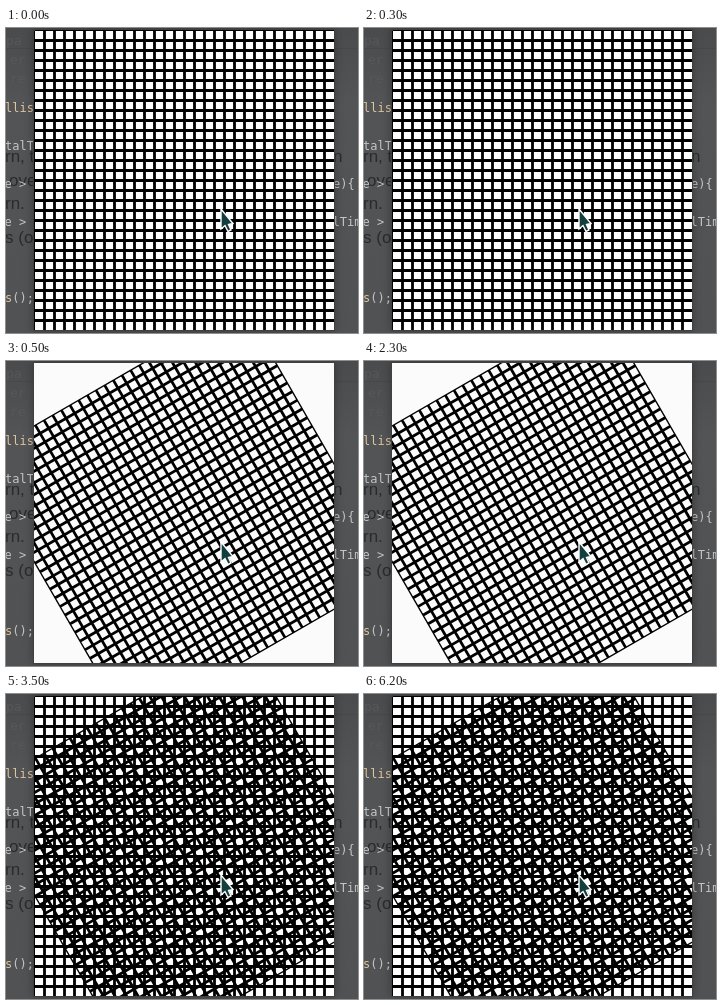
An HTML page for the animation above (8 s loop, 352x305 px).

```html
<!DOCTYPE html>
<html lang="en">
<head>
<meta charset="utf-8">
<title>Moiré grids</title>
<style>
  html, body { margin: 0; width: 100%; height: 100%; overflow: hidden; background: #505254; }
  svg { display: block; width: 352px; height: 305px; }
  .code { font: 12px "DejaVu Sans Mono", monospace; fill: #c3c6c8; white-space: pre; }
  .code .call { fill: #dfc59a; }
  .ghost { font: 17px "Liberation Sans", Arial, sans-serif; fill: #292b2d; }
  .faint { font: 13px "DejaVu Sans Mono", monospace; fill: #56585a; }
  #window { filter: drop-shadow(0 0 4px rgba(0, 0, 0, .3)); }
</style>
</head>
<body>
<svg viewBox="0 0 352 305">
  <defs>
    <linearGradient id="shade" x2="0" y2="1">
      <stop stop-color="#494b4d"/>
      <stop offset=".25" stop-color="#525456"/>
      <stop offset="1" stop-color="#505254"/>
    </linearGradient>
    <clipPath id="panel"><rect x="28" y="2" width="300" height="300"/></clipPath>
    <clipPath id="sheet"><rect x="23.2" y="1" width="310" height="310"/></clipPath>
  </defs>
  <rect width="352" height="305" fill="url(#shade)"/>
  <path d="M0 20.5H352" stroke="#464849"/>
  <g class="faint">
    <text x="0" y="17">pa</text><text x="4" y="36">er</text><text x="4" y="55">re</text>
  </g>
  <g class="ghost">
    <text x="-1" y="134">rn, t</text><text x="3" y="158">ove</text>
    <text x="-1" y="181">rn.</text><text x="-1" y="215">s (o</text><text x="327" y="134">n</text>
  </g>
  <g class="code">
    <text class="call" x="-1" y="84">llis</text>
    <text x="-1" y="122">talT</text>
    <text x="-1.5" y="160">e &gt;</text><text x="327" y="160">e){</text>
    <text x="-1.5" y="198">e &gt;</text><text x="326.5" y="198">lTime</text>
    <text x="-1" y="274"><tspan class="call">s</tspan>();</text>
  </g>
  <rect id="window" x="27" y="1" width="302" height="302" fill="#3e4042"/>
  <g clip-path="url(#panel)">
    <rect id="paper" x="28" y="2" width="300" height="300"/>
    <g id="straight" stroke="#000">
      <path id="straightLines" stroke-width="2.8"/>
      <path d="M28.5 302V2.5H328" fill="none"/>
    </g>
    <g id="turned" transform="rotate(-30 178 152)">
      <path id="turnedLines" stroke="#000" stroke-width="2.8" clip-path="url(#sheet)"/>
    </g>
  </g>
  <path d="M215 181V201L219 197.500L222 203.500L225 202L222.500 196.500L227 195.500Z"
        fill="#123f3d" stroke="#fff" stroke-width="1.4"/>
</svg>
<script>
  const LOOP = 8000, STEP = 10;
  const part = id => document.getElementById(id);

  function gridPath(left, top, size, first, last) {
    let path = "";
    for (let d = first; d <= last; d += STEP)
      path += `M${left + d} ${top}v${size}M${left} ${top + d}h${size}`;
    return path;
  }

  part("straightLines").setAttribute("d", gridPath(28.5, 2.5, 300, STEP, 290));
  part("turnedLines").setAttribute("d", gridPath(23.2, 1, 310, 0, 310));

  function draw(now) {
    const time = now % LOOP;
    const onlyStraight = time < 500, onlyTurned = !onlyStraight && time < 3500;
    part("straight").style.display = onlyTurned ? "none" : "";
    part("turned").style.display = onlyStraight ? "none" : "";
    part("paper").setAttribute("fill", onlyTurned ? "#fbfbfb" : "#fff");
    requestAnimationFrame(draw);
  }
  draw(performance.now());
</script>
</body>
</html>
```
